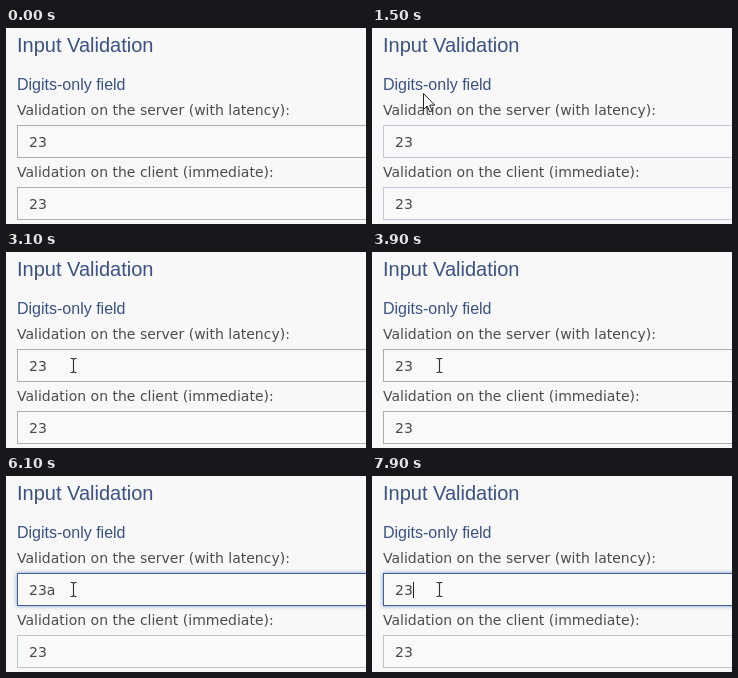
These frames come from a looping animation (360 px wide and 196 px high, 8000 ms). An HTML page with a canvas:

```html
<!DOCTYPE html>
<html lang="en">
<head>
<meta charset="utf-8">
<title>Input Validation</title>
<style>
html, body { margin: 0; width: 100%; height: 100%; overflow: hidden; background: #f8f8f8; }
canvas { display: block; }
</style>
</head>
<body>
<canvas id="stage" width="360" height="196"></canvas>
<script>
const ctx = document.getElementById('stage').getContext('2d');
const LOOP = 8000;
const SANS = '"Liberation Sans", Arial, sans-serif';
const WIDE = '"DejaVu Sans", Verdana, sans-serif';

const FOCUS = 4300, TYPED = 5500, REJECTED = 6700;
// Pointer hot spot: time, x, y
const path = [
  [500, 350, 72], [700, 268, 62], [900, 165, 57], [1100, 92, 59],
  [1300, 58, 63], [1500, 51, 65], [1700, 51, 66], [1900, 53, 78],
  [2100, 56, 98], [2300, 59, 117], [2500, 60, 126], [2700, 62, 124],
  [2900, 66, 116], [3100, 68, 113]
];

function tick(t) {
  const s = Math.floor((t - 100) / 200) * 200 + 100;
  return s === 5300 || s === 7100 ? s - 200 : s;
}

function pointerAt(t) {
  let p = path[0];
  for (const q of path) if (q[0] <= t) p = q;
  return p;
}

function text(str, x, y, font, color) {
  ctx.font = font;
  ctx.fillStyle = color;
  ctx.fillText(str, x, y);
}

function field(y, value, border, fill) {
  ctx.fillStyle = fill;
  ctx.fillRect(11, y, 360, 33);
  ctx.strokeStyle = border;
  ctx.lineWidth = 1;
  ctx.strokeRect(11.5, y + 0.5, 360, 32);
  text(value, 23, y + 22, '14px ' + WIDE, '#484848');
}

function glow(y) {
  ctx.save();
  ctx.shadowColor = 'rgba(70, 110, 180, 0.7)';
  ctx.shadowBlur = 4;
  ctx.fillStyle = '#f8f8f8';
  ctx.fillRect(11, y, 370, 33);
  ctx.restore();
}

function arrow(x, y) {
  const pts = [[0, 0], [0, 16], [3.7, 12.5], [6.2, 18.5], [8.7, 17.4], [6.2, 11.6], [11.3, 11.6]];
  ctx.beginPath();
  pts.forEach(([dx, dy]) => ctx.lineTo(x + 0.5 + dx, y + 0.5 + dy));
  ctx.closePath();
  ctx.fillStyle = '#fff';
  ctx.fill();
  ctx.strokeStyle = '#222';
  ctx.lineWidth = 1;
  ctx.stroke();
}

function beam(x, y) {
  ctx.beginPath();
  for (const side of [-1, 1]) {
    ctx.moveTo(x - 3, y + side * 7);
    ctx.lineTo(x - 1, y + side * 7);
    ctx.lineTo(x, y + side * 6);
    ctx.lineTo(x + 1, y + side * 7);
    ctx.lineTo(x + 3, y + side * 7);
  }
  ctx.moveTo(x, y - 6);
  ctx.lineTo(x, y + 6);
  ctx.strokeStyle = '#fff';
  ctx.lineWidth = 3;
  ctx.stroke();
  ctx.strokeStyle = '#333';
  ctx.lineWidth = 1.2;
  ctx.stroke();
}

function caretOn(t) {
  const since = t >= REJECTED ? REJECTED : t >= TYPED ? TYPED : FOCUS;
  return t >= FOCUS && (t - since) % 1000 < 500;
}

function draw(time) {
  const t = tick(time);
  const focused = t >= FOCUS;
  const value = t >= TYPED && t < REJECTED ? '23a' : '23';
  const idle = t >= 500 && t < 2900 ? '#c6c7da' : '#adadad';
  const warn = t < REJECTED ? 0 : t < 7300 ? 1 : Math.max(0, (7700 - t) / 600);

  ctx.fillStyle = '#f8f8f8';
  ctx.fillRect(0, 0, 360, 196);
  text('Input Validation', 11, 24, '20px ' + SANS, '#3a5183');
  text('Digits-only field', 11, 62, '16px ' + SANS, '#3a5183');
  text('Validation on the server (with latency):', 11, 87, '14px ' + WIDE, '#4c4c4c');
  text('Validation on the client (immediate):', 11, 149, '14px ' + WIDE, '#4c4c4c');

  if (focused) glow(97);
  const blue = Math.round(249 - 105 * warn);
  field(97, value, focused ? '#415f95' : idle, `rgb(249, 249, ${blue})`);
  field(159, '23', focused ? '#bcc5ca' : idle, '#f9f9f9');

  if (caretOn(t)) {
    ctx.fillStyle = '#222';
    ctx.fillRect(value === '23' ? 41 : 50, 106, 1, 16);
  }
  if (t >= 500) {
    const [, x, y] = pointerAt(t);
    if (t < 2900) arrow(x, y);
    else beam(x - 0.5, y + 0.5);
  }
}

function frame(now) {
  draw(now % LOOP);
  requestAnimationFrame(frame);
}
draw(0);
requestAnimationFrame(frame);
</script>
</body>
</html>
```
